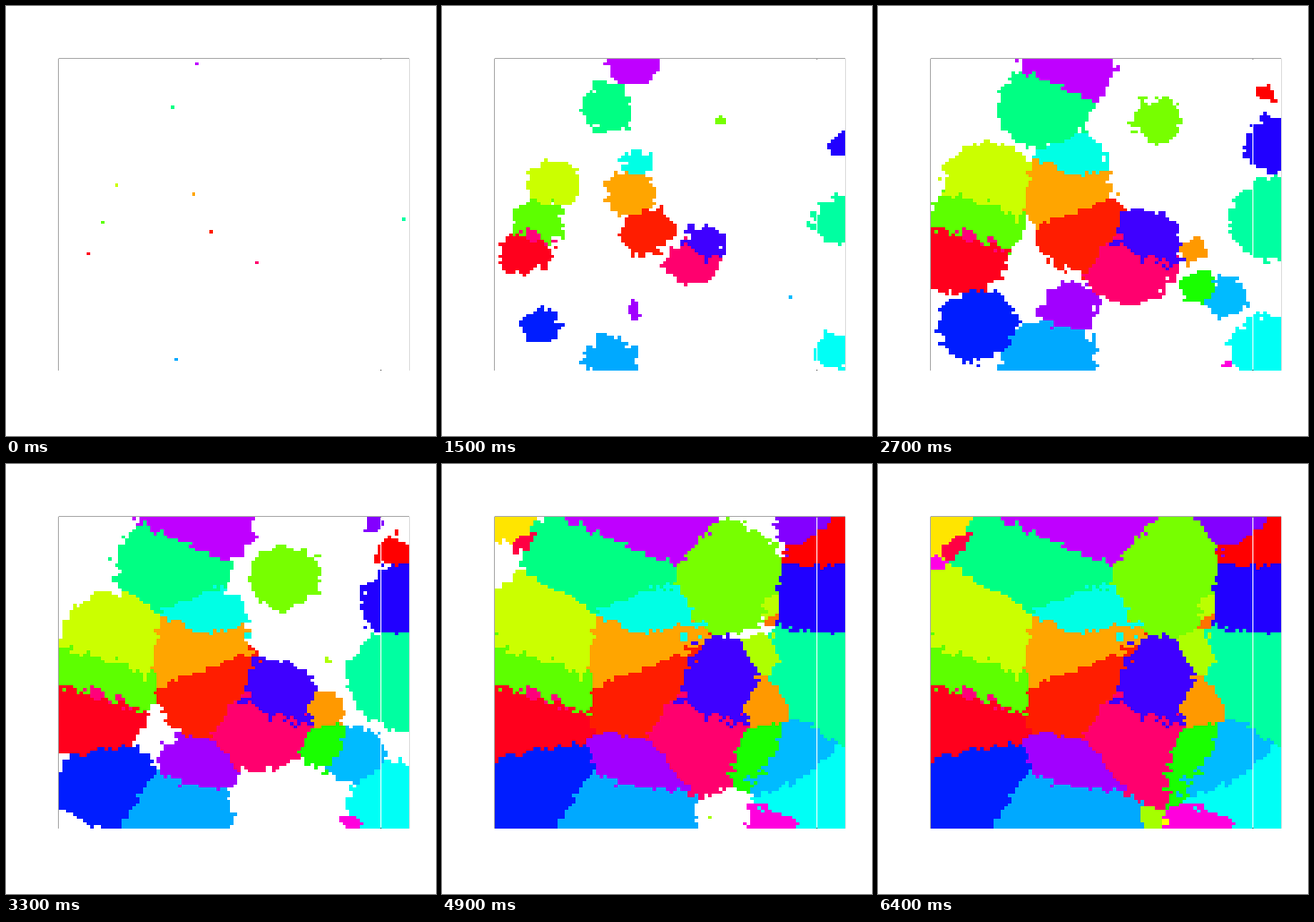
Recreate the animation shown at these times as a matplotlib script. Size 480x480 px, loop 6500 ms.

```python
import colorsys

import matplotlib.pyplot as plt
import numpy as np
from matplotlib.animation import FuncAnimation

SIZE, CELLS, STEPS = 480, 100, 65
LEFT, RIGHT, TOP, BOTTOM = 59.04, 449.76, 59.04, 406.56
LINE = 0.75    # box line width in pixels
GAP = 418      # pixel column left bare between two cell columns
SPEED = 0.5    # cells per step
ROUGH = 1.5    # spread of the arrival steps

# nuclei in order of birth: hue, column, row
FIRST = [
    (285, 39, 1), (151, 32, 15), (72, 16, 40), (98, 12, 52), (39, 38, 43),
    (7, 43, 55), (353, 8, 62), (334, 56, 65), (200, 33, 96), (158, 98, 51),
]
LATER = [
    (255, 59, 60), (178, 97, 93), (233, 13, 85), (331, 11, 55),
    (174, 40, 33), (248, 98, 27), (278, 39, 80), (92, 64, 19),
    (196, 84, 76), (114, 76, 73), (36, 75, 61), (0, 95, 11),
    (308, 84, 98), (271, 89, 2), (79, 77, 46), (54, 4, 1),
    (76, 78, 27), (344, 8, 7), (27, 79, 33), (81, 61, 96),
    (306, 2, 15), (60, 67, 98),
]


def birth(order):
    """The first nuclei start together, later ones ever more slowly."""
    n = max(0, order - len(FIRST) + 1)
    return 1.8 + 54.5 * (n / len(LATER)) ** 1.6 if n else 0


def blur(a):
    return (2 * a + sum(np.roll(a, s, axis) for s in (-1, 1)
                        for axis in (0, 1))) / np.sqrt(8)


def arrival(rng, col, row, start):
    """Step at which a crystal would reach each cell."""
    y, x = np.mgrid[:CELLS, :CELLS]
    dist = np.hypot(x - col, y - row)
    noise = blur(rng.normal(0, ROUGH, dist.shape))
    return start + dist / SPEED + noise * np.minimum(1, dist / 3)


def coverage(lo, hi):
    """Share of every pixel that lies between lo and hi."""
    p = np.arange(SIZE)
    return np.clip(np.minimum(p + 1, hi) - np.maximum(p, lo), 0, 1)


def box():
    def block(grow):
        return np.outer(coverage(TOP - grow, BOTTOM + grow),
                        coverage(LEFT - grow, RIGHT + grow))

    shade = block(LINE / 2) - block(-LINE / 2)
    return np.repeat(1 - shade[:, :, None], 3, axis=2)


def pixel_cells(lo, hi):
    """Painted pixels along one axis and the cell each belongs to."""
    edges = np.round(np.linspace(lo, hi, CELLS + 1)).astype(int)
    pixels = np.arange(edges[0], edges[-1])
    return pixels, np.searchsorted(edges, pixels, side="right") - 1


rng = np.random.default_rng(11)
nuclei = FIRST + LATER
times = np.array([arrival(rng, col, row, birth(i))
                  for i, (_, col, row) in enumerate(nuclei)])
palette = np.array([colorsys.hsv_to_rgb(n[0] / 360, 1, 1) for n in nuclei])
colours = palette[times.argmin(axis=0)]
filled = np.minimum(times.min(axis=0), STEPS - 1)

base = box()
xs, cell_x = pixel_cells(LEFT, RIGHT)
ys, cell_y = pixel_cells(TOP, BOTTOM)
keep = xs != GAP
xs, cell_x = xs[keep], cell_x[keep]


def picture(step):
    cells = np.where((filled <= step)[:, :, None], colours, 1.0)
    img = base.copy()
    img[np.ix_(ys, xs)] = cells[np.ix_(cell_y, cell_x)]
    return img


fig = plt.figure(figsize=(4.8, 4.8), dpi=100, facecolor="white")
ax = fig.add_axes([0, 0, 1, 1])
ax.axis("off")
view = ax.imshow(picture(0), interpolation="nearest", aspect="auto")


def update(step):
    view.set_data(picture(step))
    return (view,)


anim = FuncAnimation(fig, update, frames=STEPS, interval=100, repeat=True)
plt.show()
```
